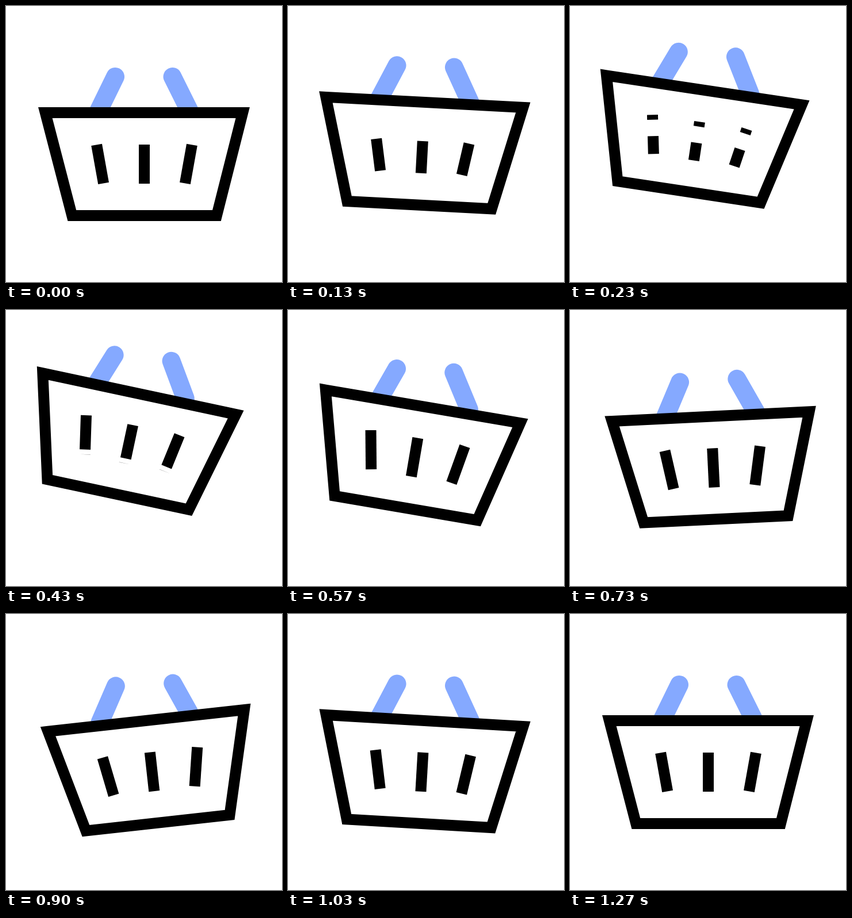
Animation, 480 px wide and 480 px high, one loop 1370 ms. Source, as an HTML page:

```html
<!DOCTYPE html>
<html lang="en">
<head>
<meta charset="utf-8">
<title>Basket</title>
<style>
  html, body { margin: 0; width: 100%; height: 100%; overflow: hidden; background: #fff; }
  svg { display: block; width: 100vw; height: 100vh; }
  path { fill: none; stroke: #000; stroke-width: 19; }
  .handle { stroke: #85a9ff; stroke-width: 32; stroke-linecap: round; }
  .body { fill: #fff; }
</style>
</head>
<body>
<svg viewBox="0 0 480 480">
  <g id="handles">
    <path class="handle" d="M190 123L159.7 185M289.5 123L320.3 185"/>
    <g id="basket">
      <path class="body" d="M68.3 185.5H411.7L366.4 364.5H114.8Z"/>
      <path class="slat" pathLength="1" d="M157.6 241.3L169.6 308.3"/>
      <path class="slat" pathLength="1" d="M240.5 241V309"/>
      <path class="slat" pathLength="1" d="M323.4 241.3L311.4 308.3"/>
    </g>
  </g>
</svg>
<script>
const LOOP = 1370, FPS = 30;
const handles = document.getElementById('handles');
const basket = document.getElementById('basket');
const slats = document.querySelectorAll('.slat');

const easeInOut = (x, p) => x < .5 ? (2 * x) ** p / 2 : 1 - (2 - 2 * x) ** p / 2;

// Each key is [start, end, value, power]; the value holds between keys.
function track(keys, time) {
  let value = 0;
  for (const [start, end, target, power = 2] of keys) {
    const x = Math.min(1, Math.max(0, (time - start) / (end - start)));
    value += (target - value) * easeInOut(x, power);
  }
  return value;
}

const lift = [[0, 8.6, 41.7], [9.6, 23.6, 0, 3]];
const handleTilt = [[0, 10, 6], [13.5, 24.5, -4.4], [24.5, 31.2, 1.75], [31.5, 38, 0]];
const basketTilt = [[0, 11.3, 12.05], [14, 26, -7], [26, 31.5, 3.5], [31.7, 38, 0]];
const erase = [[0, 13.4, 1]];
const redraw = [[4, 16, 1]];

function draw(time) {
  const tilt = track(handleTilt, time);
  handles.setAttribute('transform', `translate(0 ${-track(lift, time)}) rotate(${tilt} 240 107)`);
  basket.setAttribute('transform', `rotate(${track(basketTilt, time) - tilt} 240 185)`);

  const head = track(redraw, time), tail = track(erase, time);
  const dash = tail === 0 || head === 1 ? 'none' : `${head} ${tail - head} ${1 - tail} 2`;
  slats.forEach(slat => slat.style.strokeDasharray = dash);
}

function tick() {
  draw(Math.floor(performance.now() % LOOP / 1000 * FPS + .15));
  requestAnimationFrame(tick);
}
tick();
</script>
</body>
</html>
```
